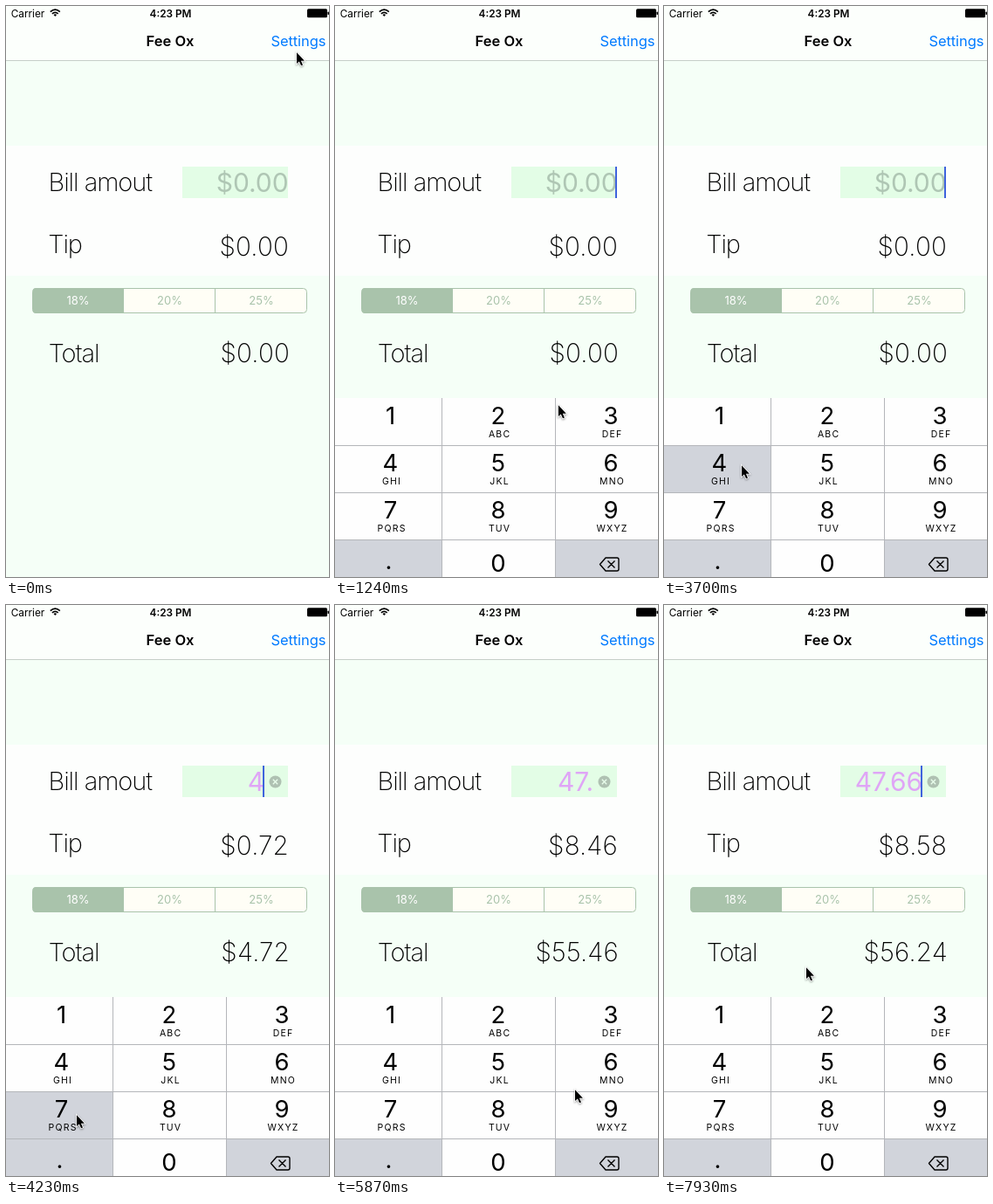
An HTML page for the animation above (8000 ms loop, 370 by 654 pixels).

```html
<!DOCTYPE html>
<html lang="en">
<head>
<meta charset="utf-8">
<title>Tip calculator</title>
<style>
  html, body { margin: 0; height: 100%; overflow: hidden; background: #f5fff7; }
  svg { display: block; width: 100vw; height: 100vh; font-family: Inter, Roboto, sans-serif; }
  .label { font-size: 29px; font-weight: 200; letter-spacing: -1.05px; }
  .amount { font-size: 29.5px; font-weight: 200; letter-spacing: .2px; text-anchor: end; }
  .bill { font-size: 30px; font-weight: 400; letter-spacing: -.1px; text-anchor: end; }
  .segment { font-size: 13px; text-anchor: middle; fill: #a9c3ab; }
  .digit { font-size: 27.5px; text-anchor: middle; }
  .letters { font-size: 10.5px; letter-spacing: 1.2px; text-anchor: middle; }
</style>
</head>
<body>
<svg viewBox="0 0 370 654">
  <rect width="370" height="654" fill="#f5fff7"/>
  <rect width="370" height="62" fill="#fcfffc"/>
  <rect y="62" width="370" height="1" fill="#c6cfc8"/>
  <rect y="160" width="370" height="149" fill="#fdfefd"/>

  <text x="5.7" y="12.5" font-size="11.8">Carrier</text>
  <g fill="none" stroke="#000" stroke-width="1.7">
    <path d="M50.8 6.6Q56.3 1.6 61.8 6.6M52.9 8.8Q56.3 5.8 59.7 8.8"/>
    <path d="M54.5 10.1Q56.3 8.6 58.1 10.1L56.3 12Z" fill="#000" stroke="none"/>
  </g>
  <text x="188.5" y="12.5" font-size="11.8" font-weight="600" text-anchor="middle">4:23 PM</text>
  <rect x="345" y="3.3" width="23" height="10" rx="1.5"/>
  <rect x="368.5" y="6.5" width="1.5" height="3.6" rx=".7"/>
  <text x="188" y="46" font-size="16.5" font-weight="600" text-anchor="middle">Fee Ox</text>
  <text x="303.5" y="46" font-size="16.5" letter-spacing="-.1" fill="#007aff">Settings</text>

  <g class="label">
    <text x="48.5" y="212">Bill amout</text>
    <text x="48.3" y="282.5">Tip</text>
    <text x="48.7" y="407.5">Total</text>
  </g>
  <rect x="202" y="184" width="121" height="36" fill="#e3fde6"/>
  <text id="bill" class="bill" y="212.5"/>
  <g id="clear">
    <circle cx="308.5" cy="202.5" r="7" fill="#afc1b2"/>
    <path d="M305.8 199.8l5.4 5.4m0-5.4l-5.4 5.4" stroke="#e9fdec" stroke-width="1.3"/>
  </g>
  <rect id="caret" y="184" width="2" height="36" fill="#3f63dd"/>
  <text id="tip" class="amount" x="324" y="285.5"/>
  <text id="total" class="amount" x="325" y="407.5"/>

  <rect x="30.5" y="323.5" width="314" height="28" rx="4" fill="#fffef6" stroke="#a9c3ab"/>
  <path d="M135 323H34.5a4 4 0 0 0-4 4v21a4 4 0 0 0 4 4H135Z" fill="#a9c3ab"/>
  <path d="M239.5 323v29" stroke="#a9c3ab"/>
  <g class="segment">
    <text x="82.5" y="342" style="fill:#fff">18%</text>
    <text x="187.5" y="342">20%</text>
    <text x="292.5" y="342">25%</text>
  </g>

  <g id="keyboard"></g>
  <path id="cursor" d="M1 1.3V14L3.9 11.4L6.1 16.3L8 15.4L5.9 10.7H9.9Z" stroke="#fff" paint-order="stroke"
    stroke-width="1.6" style="filter:drop-shadow(0 1px 1px #0006)"/>
</svg>
<script>
const LOOP = 8000, GREY = '#d1d4db';
const $ = id => document.getElementById(id);
const clamp = v => Math.min(1, Math.max(0, v));

const columns = [[0, 123, 63.5], [123, 130, 187], [253, 122, 316]]; // left, width, label centre
const keys = ['1', '2 ABC', '3 DEF', '4 GHI', '5 JKL', '6 MNO', '7 PQRS', '8 TUV', '9 WXYZ', '.', '0', 'del'];
const presses = [['4', 3620, 3780], ['7', 4190, 4360], ['.', 4960, 5100], ['6', 6300, 6440], ['6', 6560, 6700]];
const caretOff = [[1330, 1640], [2210, 2740], [3260, 3620], [5060, 5110], [5650, 6040], [7230, 7650]];

// time, x, y of the pointer's tip
const path = [
  [0, 332, 52], [60, 332, 52], [450, 271, 211], [850, 271, 211], [1240, 255, 456], [1560, 190, 500],
  [1940, 88, 525], [3840, 88, 525], [4160, 80, 583], [4440, 80, 583], [4900, 68, 620], [5100, 68, 620],
  [5270, 114, 597], [6130, 330, 539], [7020, 330, 539], [7230, 334, 595], [7840, 161, 411], [7930, 162, 414]
];

$('keyboard').innerHTML = keys.map((key, i) => {
  const [left, width, cx] = columns[i % 3], top = 449 + 54 * Math.floor(i / 3);
  const [digit, letters] = key.split(' ');
  const baseline = top + (letters || digit === '1' ? 30 : digit === '.' ? 34 : 36.5);
  const face = digit === 'del'
    ? `<path d="M303.5 639.5L310 632H323Q325 632 325 634V645Q325 647 323 647H310ZM312.5 635.5l8 8m0-8l-8 8"
        fill="none" stroke="#000" stroke-width="1.4" stroke-linejoin="round"/>`
    : `<text class="digit" x="${digit === '.' ? 61.5 : cx}" y="${baseline}">${digit}</text>
       <text class="letters" x="${cx + 1.6}" y="${top + 45}">${letters || ''}</text>`;
  return `<rect id="key${digit}" x="${left}" y="${top}" width="${width}" height="54"/>${face}`;
}).join('') + '<path d="M0 503.5H370M0 557.5H370M0 611.5H370M122.5 449V665M252.5 449V665" stroke="#b4b6ba"/>';

function pointerAt(t) {
  const i = path.findIndex(p => p[0] > t);
  if (i < 0) return path.at(-1).slice(1);
  const [t0, x0, y0] = path[i - 1], [t1, x1, y1] = path[i];
  const u = (t - t0) / (t1 - t0), s = u * u * (3 - 2 * u) * .5 + u * .5;
  return [x0 + (x1 - x0) * s, y0 + (y1 - y0) * s];
}

function caretAlpha(t) {
  if (t < 800) return 0;
  return Math.min(1, ...caretOff.map(([out, back]) =>
    t < out ? 1 : t < back ? 1 - clamp((t - out) / 170) : clamp((t - back + 20) / 100)));
}

function draw(t) {
  const typed = presses.filter(p => t >= p[2]).map(p => p[0]).join('');
  const bill = Number(typed);
  const money = value => '$' + value.toFixed(2);

  $('bill').textContent = typed || '$0.00';
  $('bill').setAttribute('x', typed ? 296 : 323.5);
  $('bill').setAttribute('fill', typed ? '#dfa5f6' : '#afc6b4');
  $('clear').setAttribute('opacity', typed ? 1 : 0);
  $('caret').setAttribute('x', typed ? 294 : 321);
  $('caret').setAttribute('opacity', caretAlpha(t));
  $('tip').textContent = money(bill * .18);
  $('total').textContent = money(bill * 1.18);

  for (const key of keys) {
    const digit = key.split(' ')[0];
    const pressed = presses.some(([k, down, up]) => k === digit && t >= down && t < up);
    const grey = digit === '.' || digit === 'del';
    $('key' + digit).setAttribute('fill', pressed !== grey ? GREY : '#fefefe');
  }
  const hidden = (1 - clamp((t - 760) / 400)) ** 3;
  $('keyboard').setAttribute('transform', `translate(0 ${216 * hidden})`);
  $('cursor').setAttribute('transform', `translate(${pointerAt(t)})`);
}

const start = performance.now();
function tick() {
  draw((performance.now() - start) % LOOP);
  requestAnimationFrame(tick);
}
tick();
</script>
</body>
</html>
```
